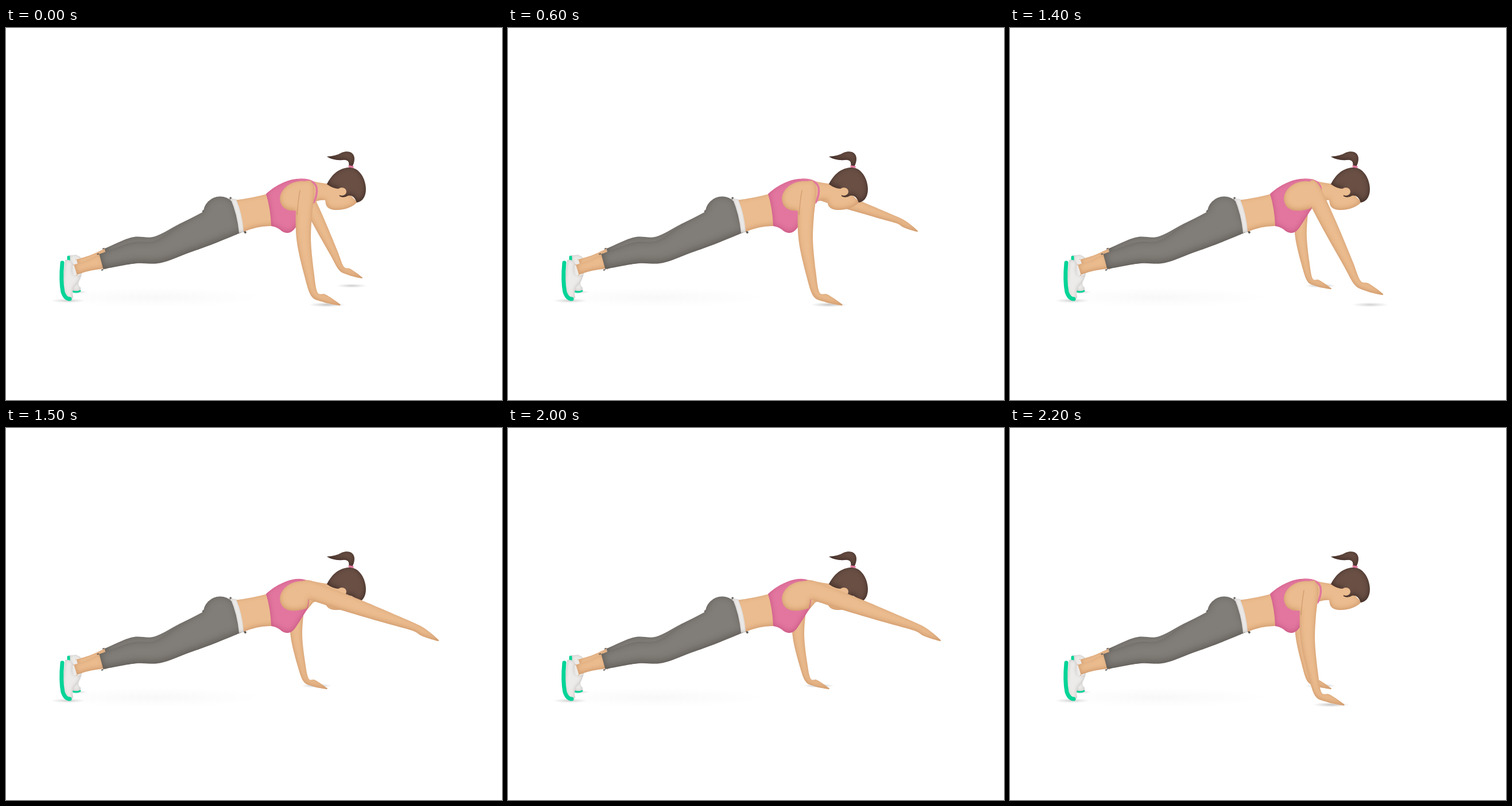
An HTML page that plays this animation: 864x648 px, repeating every 2800 ms.

```html
<!DOCTYPE html>
<html lang="en">
<head>
<meta charset="utf-8">
<title>Plank reach</title>
<style>
  html, body { margin: 0; width: 100%; height: 100%; overflow: hidden; background: #fff; }
  svg { display: block; width: 100vw; height: 100vh; }
</style>
</head>
<body>
<svg id="stage" viewBox="0 0 864 648" xmlns="http://www.w3.org/2000/svg"></svg>
<script>
const STEP = 100, LOOP = 2800;
const SKIN = '#ebbc8f', PINK = '#e2769f', PANTS = '#817d78', HAIR = '#694f44',
      GREEN = '#04d497', SHOE = '#edebe9';

// Smooth closed curve through points; a repeated point makes a corner.
function smooth(p) {
  const n = p.length, at = i => p[(i + n) % n];
  let d = `M${p[0]}`;
  for (let i = 0; i < n; i++) {
    const [a, b, c, e] = [at(i - 1), at(i), at(i + 1), at(i + 2)];
    const out = b.map((v, k) => (v + (c[k] - a[k]) / 6).toFixed(1));
    const into = c.map((v, k) => (v - (e[k] - b[k]) / 6).toFixed(1));
    d += `C${out} ${into} ${c}`;
  }
  return d + 'Z';
}

// Outline of a limb whose spine is a list of [x, y, radius].
function limb(spine) {
  const last = spine.length - 1;
  const side = sign => spine.flatMap(([x, y, r], i) => {
    const a = spine[Math.max(i - 1, 0)], b = spine[Math.min(i + 1, last)];
    const dx = b[0] - a[0], dy = b[1] - a[1], k = sign * r / Math.hypot(dx, dy);
    const point = [x - dy * k, y + dx * k];
    return i === 0 || i === last ? [point, point] : [point];
  });
  return smooth([...side(1), ...side(-1).reverse()]);
}

const polar = (deg, r) => [r * Math.cos(deg * Math.PI / 180), r * Math.sin(deg * Math.PI / 180)];

// Planted, lifting, halfway, stretched.
const poses = [
  { angle: 85.6, reach: 183, hand: 23, bow: 11 },
  { angle: 64, reach: 181, hand: 25, bow: 0 },
  { angle: 19.6, reach: 196, hand: 29, bow: 0 },
  { angle: -5.6, reach: 216, hand: -11, bow: 0 }
];

// Places an arm; returns its outline and the middle of the hand.
function arm([x, y], { angle, reach, hand, bow }, size) {
  const [ux, uy] = polar(angle, 1), [hx, hy] = polar(hand, 49 * size);
  const length = reach * size, thick = size * reach / 188;
  const along = (t, r) => {
    const b = bow * size * Math.sin(Math.PI * Math.max(t, 0));
    return [x + ux * length * t - uy * b, y + uy * length * t + ux * b, r * thick];
  };
  const wrist = along(1, 6.5);
  const palm = (t, r) => [wrist[0] + hx * t, wrist[1] + hy * t, r * size];
  const spine = [along(-.08, 9), along(0, 15), along(.25, 14.5), along(.5, 12.5), along(.8, 9), wrist,
                 palm(.35, 7), palm(.7, 4.5), palm(1, 1)];
  return { d: limb(spine), mid: palm(.5, 0) };
}

const path = (fill, d, id = '') => `<path ${id && `id="${id}"`} fill="${fill}" d="${d}"/>`;
const oval = (fill, x, y, rx, ry) => `<ellipse cx="${x}" cy="${y}" rx="${rx}" ry="${ry}" fill="${fill}"/>`;
const round = (filter, ...body) => `<g filter="url(#${filter})">${body.join('')}</g>`;
const line = (d, color, width, extra = '') =>
  `<path d="${d}" fill="none" stroke="${color}" stroke-width="${width}" stroke-linecap="round" ${extra}/>`;
const blob = (x, y, rx, ry, alpha, id = '') =>
  `<ellipse ${id && `id="${id}"`} cx="${x}" cy="${y}" rx="${rx}" ry="${ry}" fill="url(#floor)" opacity="${alpha}"/>`;

// Darkens a shape towards its rim, more so below.
const rim = (id, [r, g, b], k, blur) => `
  <filter id="${id}" x="-10%" y="-10%" width="120%" height="120%" color-interpolation-filters="sRGB">
    <feGaussianBlur in="SourceAlpha" stdDeviation="${blur}"/>
    <feOffset dy="${-blur * 0.4}"/>
    <feColorMatrix values="0 0 0 0 ${r} 0 0 0 0 ${g} 0 0 0 0 ${b} 0 0 0 ${-k} ${k}"/>
    <feComposite in2="SourceAlpha" operator="in" result="shade"/>
    <feMerge><feMergeNode in="SourceGraphic"/><feMergeNode in="shade"/></feMerge>
  </filter>`;

const stage = document.getElementById('stage');
stage.innerHTML = `
  <defs>
    ${rim('skin', [.6, .32, .13], .36, 4)}
    ${rim('cloth', [.2, .18, .16], .5, 7)}
    ${rim('pink', [.6, .1, .3], .36, 5)}
    ${rim('hair', [.12, .06, .05], .6, 5)}
    ${rim('shoe', [.35, .33, .32], .3, 3)}
    <radialGradient id="floor">
      <stop offset="0" stop-color="#777"/><stop offset=".5" stop-color="#777" stop-opacity=".45"/>
      <stop offset="1" stop-color="#777" stop-opacity="0"/>
    </radialGradient>
  </defs>
  <rect width="864" height="648" fill="#fff"/>
  ${blob(260, 469, 190, 17, .05)}
  ${blob(108, 475, 30, 4, .35)}
  ${blob(124, 460, 18, 3, .3)}
  ${blob(0, 0, 27, 3.5, 0, 'farShade')}
  ${blob(0, 0, 32, 4, 0, 'nearShade')}

  ${round('shoe', path(SHOE, 'M110 396L122 395Q134 399 136 412L131 432Q122 447 130 452L130 459L116 459Z'))}
  ${line('M109 399V404', GREEN, 5)}
  ${line('M117 459Q124 461 129 458', GREEN, 3)}
  ${round('skin', path(SKIN, limb([[175, 395, 11], [150, 404, 9], [125, 411, 8]])))}
  ${round('skin', path(SKIN, limb([[168, 406, 13.5], [143, 414, 9.5], [121, 421, 9]])))}
  ${round('shoe', path(SHOE, `M103 404Q113 402 117 411Q113 426 119 431L131 431Q129 442 120 450
    Q114 457 117 469Q114 476 106 474L98 450Z`))}
  ${line('M98 409Q95 440 99 460Q103 472 111 472', GREEN, 7)}

  ${round('skin', path(SKIN, '', 'farArm'))}
  ${round('skin', path(SKIN, `M398 300Q430 296 455 289C480 268 505 259 535 267Q560 273 580 272L612 303
    C600 318 560 324 557 306L556 300Q546 299 535 304L505 340Q480 346 463 345Q440 344 414 355L400 357Z`))}
  ${round('cloth', path(PANTS, limb([[175, 396, 12], [222, 382, 17.5], [262, 381, 18], [308, 363, 22], [352, 345, 25]])))}
  ${round('cloth', path(PANTS, limb([[166, 407, 13.5], [222, 392, 18.5], [264, 390, 20], [308, 369, 25],
    [351, 349, 29], [402, 327, 30]])), oval(PANTS, 373, 323, 29.5, 29.5))}
  ${round('shoe', path('#f4f2f0', 'M391 297L401 298Q412 325 414 355L406 357Q403 325 391 297Z'))}
  ${round('pink', path(PINK, `M453 289C476 268 508 257 524 266Q532 285 526 313Q518 327 506 345
    C498 358 488 361 477 351Q470 346 462 345Q461 315 453 289Z`))}
  ${line('M512 264Q537 263 541 278Q543 290 536 304', PINK, 3.5, 'id="strap"')}

  ${round('hair', path(HAIR, `M559 224Q575 223 585 217C600 211 614 220 603 242L597 242Q600 228 586 230
    Q570 231 559 224Z`))}
  ${round('hair', path(HAIR, `M559 272C570 250 585 243 600 243C628 245 638 300 611 304Q606 290 596 292
    Q588 297 581 293L580 280Q570 280 559 272Z`))}
  ${line('M598 241L604 242', PINK, 3.5)}
  ${oval(SKIN, 585, 285, 8, 7)}

  ${round('skin', path(SKIN, 'M520 267C498 265 478 279 477 297C478 316 494 324 524 314Q532 290 520 267Z'),
    path(SKIN, '', 'nearArm'))}
  ${line('M512 283Q509 300 507 325', '#b97f51', 1.5, 'id="crease" opacity=".45"')}`;

const el = id => document.getElementById(id);
const set = (id, values) => Object.entries(values).forEach(([k, v]) => el(id).setAttribute(k, v));

// Pose index: up in three steps, hold, then down again.
const level = k => Math.max(0, Math.min(3, k + 1, 8 - k));

function show(side, { d, mid }, ground) {
  set(side + 'Arm', { d });
  const height = ground - mid[1];
  set(side + 'Shade', { cx: mid[0], cy: ground, opacity: 0.5 * Math.max(0, 1 - height / 90) });
}

let shown = -1;
function draw(time) {
  const step = Math.floor((time % LOOP) / STEP);
  if (step === shown) return;
  shown = step;
  const far = level(step), near = level(step - 14);
  const farPose = { ...poses[far], bow: poses[far].bow + near };
  show('far', arm([511 + 8 * far, 289 - 4 * far], farPose, 0.82), 449);
  show('near', arm([near ? 526 : 523, 281], poses[near], 1), 482);
  el('strap').style.display = near > 1 ? 'none' : '';
  el('crease').style.display = near ? 'none' : '';
}

const start = performance.now();
function tick() {
  draw(performance.now() - start);
  requestAnimationFrame(tick);
}
tick();
</script>
</body>
</html>
```
